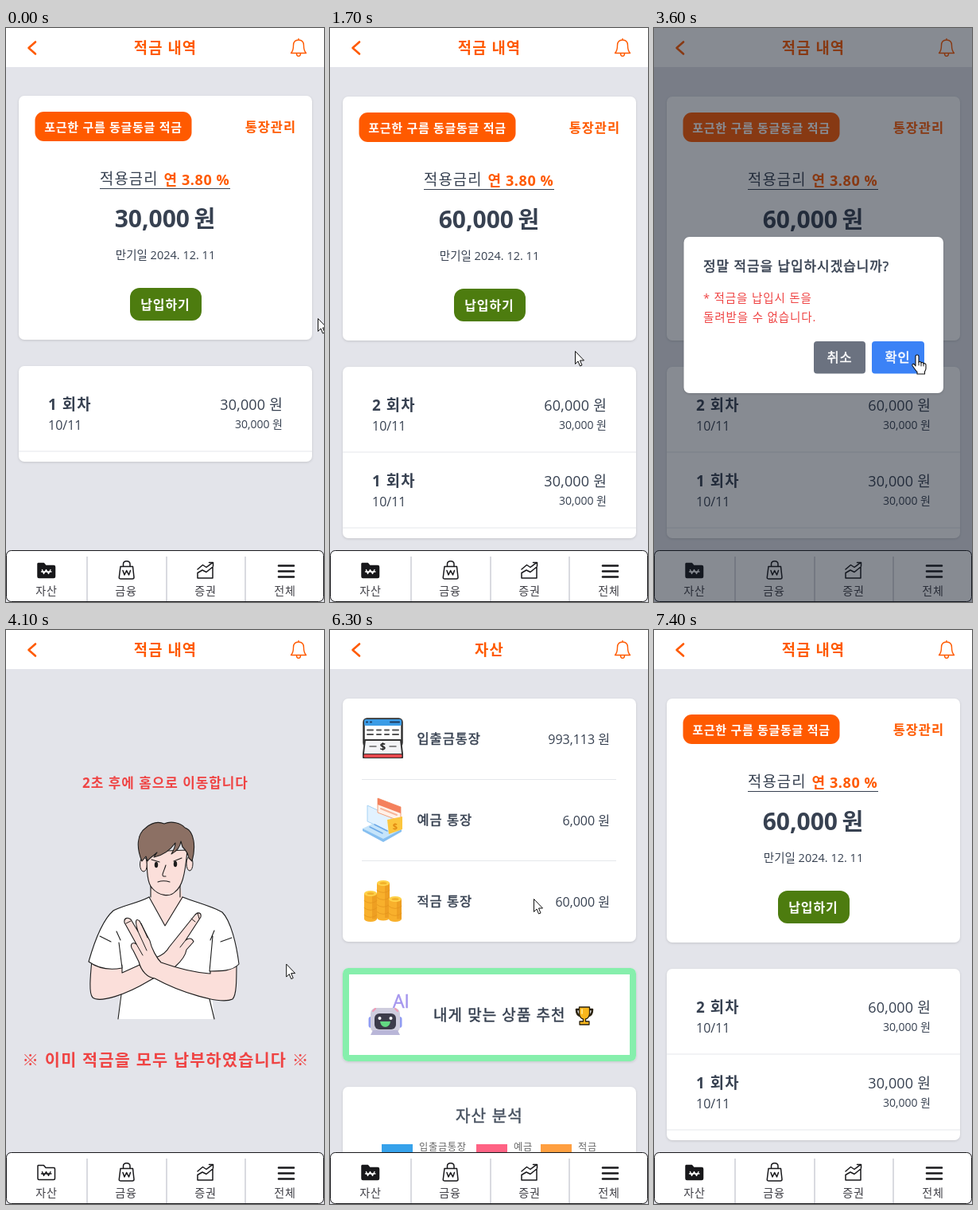
These frames come from a looping animation (400x720 px, 7.5 s). An HTML page:

```html
<!DOCTYPE html>
<html lang="ko">
<meta charset="utf-8">
<style>
html, body { margin: 0; height: 100%; overflow: hidden; background: #e3e4ea }
svg { display: block; width: 400px; height: 720px }
text { font-family: "Open Sans", "Noto Sans CJK KR", "Noto Sans CJK", sans-serif; white-space: pre }
.card { fill: #fff; filter: drop-shadow(0 1px 1.5px #0002) }
.line { fill: none; stroke-linecap: round; stroke-linejoin: round }
</style>
<body>
<script>
const ORANGE = '#ff5a00', INK = '#374151', RED = '#ef4444', RULE = '#e5e7eb';

// Drawing helpers: each returns SVG markup
function text(x, y, s, size, { w = 400, c = INK, a = 'start', ls = 0 } = {}) {
  // Hangul is set a little smaller and wider apart; weight 600 is regular with a thin outline
  if (/[가-힣]/.test(s) && !/\d{2}/.test(s)) {
    ls += size * .055;
    size *= .94;
  }
  const semi = w === 600 ? `stroke="${c}" stroke-width=".5"` : '';
  return `<text x="${x}" y="${y}" font-size="${size}" font-weight="${semi ? 400 : w}" fill="${c}" text-anchor="${a}" letter-spacing="${ls}" ${semi}>${s}</text>`;
}
const rect = (x, y, w, h, c, r = 0, extra = '') =>
  `<rect x="${x}" y="${y}" width="${w}" height="${h}" rx="${r}" fill="${c}" ${extra}/>`;
const card = (y, h) => rect(16, y, 369, h, '#fff', 7, 'class="card"');
const path = (d, fill, stroke = 'none', w = 1) =>
  `<path d="${d}" fill="${fill}" stroke="${stroke}" stroke-width="${w}" stroke-linejoin="round"/>`;
const line = (d, c, w = 1) => `<path class="line" d="${d}" stroke="${c}" stroke-width="${w}"/>`;
const oval = (x, y, rx, ry, fill, extra = '') =>
  `<ellipse cx="${x}" cy="${y}" rx="${rx}" ry="${ry}" fill="${fill}" ${extra}/>`;
const group = (id, s) => `<g id="${id}">${s}</g>`;

const header = title => rect(0, 0, 400, 49, '#fff') +
  line('M37 17.5L28.5 25L37 32.5', ORANGE, 2.6) +
  text(200.5, 31.5, title, 20, { w: 700, c: ORANGE, a: 'middle' }) +
  line('M358.5 31.5C361 29 361.5 27 361.5 22C361.5 17.5 364 15 368 15S374.5 17.5 374.5 22C374.5 27 375 29 377.5 31.5ZM365.5 32C365.5 36.5 370.5 36.5 370.5 32M368 15V13.5', ORANGE, 1.4);

function nav(active) {
  const mark = active ? '#fff' : '#18181b';
  const icons =
    path('M40.5 671.5H47.5L50 674.5H60Q61.5 674.5 61.5 676V688Q61.5 689.5 60 689.5H41.5Q40 689.5 40 688V672Z', active ? '#18181b' : '#fff', '#18181b', 1.5) +
    line('M45.5 679.5L47.5 684.5L50.5 679.5L53.5 684.5L56 679.5M44.5 682H57', mark, 1.3) +
    line('M144 675.5H159.5L161 689Q161 691 159 691H144.5Q142 691 142.3 689ZM147.5 675V672.5C147.5 667.5 156 667.5 156 672.5V675M147 680.5L149 686L151.7 680.5L154.5 686L156.5 680.5', '#18181b', 1.5) +
    line('M241 690V683.5L247 680L252 682.5L260 676V690ZM241 679L247.5 673.5L252 676.5L260 670.5M255.5 670.5H260.5V675', '#18181b', 1.5) +
    line('M343 674.5H362M343 681.5H362M343 688.5H362', '#18181b', 2.6);
  return rect(.5, 655.5, 399, 64, '#fff', 6, 'stroke="#18181b"') + icons +
    [102, 202, 301].map(x => rect(x - 1, 663, 2, 56, '#d9dae0')).join('') +
    ['자산', '금융', '증권', '전체'].map((s, i) =>
      text(51 + i * 100, 711, s, 15, { c: '#3f3f46', a: 'middle' })).join('');
}

function savings(rounds) {
  let rows = '';
  for (let n = rounds, y = 0; n > 0; n--, y += 95) rows +=
    text(53, 479 + y, n + ' 회차', 20, { w: 700 }) +
    text(53, 504 + y, '10/11', 16) +
    text(348, 479 + y, n * 30 + ',000 원', 18, { a: 'end', ls: .2 }) +
    text(348, 502 + y, '30,000 원', 14, { a: 'end' }) +
    rect(16, 530.5 + y, 369, 1, RULE);
  const body = card(85, 306) +
    rect(36.5, 105, 197, 37, ORANGE, 11) +
    text(135, 129.5, '포근한 구름 동글동글 적금', 16, { w: 700, c: '#fff', a: 'middle', ls: -.2 }) +
    text(365, 129.5, '통장관리', 17.5, { w: 700, c: ORANGE, a: 'end' }) +
    text(118, 196, '적용금리', 20) +
    text(198.5, 196.5, '연 3.80 %', 18, { w: 700, c: ORANGE, ls: .6 }) +
    rect(118, 201, 164, 1, INK) +
    text(231, 250, rounds * 30 + ',000', 30, { w: 700, a: 'end' }) +
    text(236.5, 250, '원', 31, { w: 700 }) +
    text(200.5, 290, '만기일 2024. 12. 11', 14.5, { a: 'middle' }) +
    rect(156, 326, 90, 41, '#4d7c0f', 12) +
    text(200.5, 353, '납입하기', 17, { w: 700, c: '#fff', a: 'middle' }) +
    card(424, 25 + rounds * 95) + rows;
  return `<g transform="translate(0 ${rounds - 1})">${body}</g>` + header('적금 내역') + nav(true);
}

function man() {
  const skin = '#fbdfda', ink = '#1c1c1c';
  const shape = (d, fill) => path(d, fill, ink, 1.1);
  return path('M180 336C165 343 145 346 135 352L146 424L141 488H262L256 428L272 354C258 346 240 342 222 336Z', '#fff') +
    path('M182 318V338L200 371L222 337L219 318Z', skin) +
    line('M182 318V335M219 320V335M180 335L200 371L222 335', ink, 1.1) +
    shape('M108 414C106 435 104 456 109 461C118 468 150 458 180 440L213 422C222 414 226 408 227 401L236 391C234 386 230 386 226 389L245 360C246 355 242 353 238 357L205 398C200 408 190 410 186 412L146 430V420Z', skin) +
    line('M241 355L243 362M233 362L238 366M226 389L219 398', ink) +
    shape('M290 416C290 440 290 458 285 463C270 470 220 455 187 437C178 436 170 428 167 416L160 402C155 396 158 390 164 394L149 367C148 361 153 360 157 363L166 378C162 365 163 361 168 365L181 390C183 400 190 412 195 417C215 424 240 430 257 431V424Z', skin) +
    line('M151 368L157 365M166 378L177 402M164 394L172 408M170 368L178 386', ink) +
    path('M135 352C120 365 110 395 104 416C115 424 130 427 146 424L151 375ZM272 354C283 365 290 395 293 419C285 428 270 428 256 428L251 377Z', '#fff') +
    line('M180 335C165 343 145 346 135 352C120 365 110 395 104 416C115 424 130 427 146 424L142 392M222 335C240 342 258 346 272 354C283 365 290 395 293 419C285 428 270 428 256 428L260 384M145 457L141 488M256 463L262 488M257 389L262 377M144 389L139 378M118 384L132 391M270 391L284 386', ink, 1.1) +
    oval(173, 294, 4.5, 9, skin, `stroke="${ink}"`) + oval(231, 293, 4, 9, skin, `stroke="${ink}"`) +
    shape('M177 278C177 305 178 318 184 324C192 333 206 336 213 328C221 322 225 310 228 276Z', skin) +
    shape('M171 290C164 274 164 256 176 248C184 241 192 240 199 243C208 239 220 242 225 248C237 252 239 272 234 290L230 286C229 280 226 276 222 272L220 265C219 272 214 278 208 281C211 276 213 272 213 267C206 277 196 283 186 285L190 279C185 284 180 286 178 290L176 284Z', '#8c7064') +
    line('M183 288L193 291M221 286L211 290', ink, 1.2) +
    oval(189, 294.5, 2.2, 3.8, ink) + oval(213, 293.5, 2.2, 3.8, ink) +
    line('M201 295C199 302 195 308 198 309H201M191 316Q198 313.5 206 316', ink, 1.1);
}

const failed = () => text(200.5, 198, '2초 후에 홈으로 이동합니다', 18, { w: 700, c: RED, a: 'middle' }) +
  man() +
  text(201, 547, '※ 이미 적금을 모두 납부하였습니다 ※', 22.1, { w: 700, c: RED, a: 'middle' }) +
  header('적금 내역') + nav(false);

const bankbook = () =>
  rect(42.5, 111.5, 48, 34, '#fff', 4, 'stroke="#333" stroke-width="2.5"') +
  rect(43, 112, 47, 8, '#3b9ce6', 2) +
  line('M46 115.5H47M51 115.5H52M76 115.5H87', '#1e3a5f', 2) +
  line('M47 125.5H54M59 125.5H64M69 125.5H74M79 125.5H86M47 131H54M59 131H64M69 131H74M79 131H86', '#555', 2) +
  path('M44 138H89L91 155V160H42V155Z', '#f3f4f6', '#333', 2) +
  rect(42, 155.5, 49, 5, '#e5484d', 2, 'stroke="#333"') +
  text(66.5, 150.5, '$', 13, { w: 700, c: '#222', a: 'middle' }) +
  line('M50 146H58M75 146H83', '#666', 1.5);

const laptop = () =>
  path('M41 249L64 238L90 252L67 265Z', '#c5e4fa') +
  path('M41 249L67 262V266L41 252ZM67 262L90 250V253L67 266Z', '#86bff0') +
  path('M47 220L77 234V254L47 240Z', '#e2f2ff', '#a5d2f5') +
  path('M60 211L89 222V240L60 229Z', '#fff1e8', '#f2a07b') +
  path('M60 211L89 222V230L60 219Z', '#f4805c') +
  line('M64 224L84 232', '#f7b59a', 2) +
  line('M50 247L66 255M56 244L72 252', '#6ca9e8', 1.5) +
  path('M72 238L91 234V250L74 256Z', '#fcc63d') +
  text(82, 250, '$', 11, { w: 700, c: '#e28a12', a: 'middle' });

function coins() {
  const stack = (x, top, bottom) => {
    let s = rect(x - 8, top, 16, bottom - top, '#f8b02c') + oval(x, bottom, 8, 3.5, '#f8b02c') +
      rect(x + 2, top, 6, bottom - top, '#ee9f22');
    for (let y = top + 9; y < bottom; y += 9) s += line(`M${x - 8} ${y}Q${x} ${y + 6} ${x + 8} ${y}`, '#e3921c', .7);
    return s + oval(x, top, 8, 3.5, '#ffd24a') + oval(x, top, 4.5, 1.6, '#f2b12b');
  };
  return stack(67, 317.5, 361) + stack(51, 330.5, 362.5) + stack(82, 337.5, 362.5);
}

const robot = () =>
  text(79, 474, 'AI', 23, { w: 600, c: '#a596ee' }) +
  rect(48.5, 485, 6, 14, '#8f9bf2', 3) + rect(84.5, 485, 6, 14, '#8f9bf2', 3) +
  rect(51, 474, 37, 31, '#cfcddd', 7) + path('M54 502H85L88 508H51Z', '#b9b6d8') +
  rect(56, 481, 27, 20, '#3d3c4a', 6) +
  oval(62.5, 487, 2, 2, '#fff') + oval(76.5, 487, 2, 2, '#fff') +
  path('M63 491H76Q75 498 69.5 498T63 491Z', '#63d982') + line('M57 475L54 478M82 475L85 478', '#f39ab4', 2);

const trophy = () =>
  line('M314 476H310Q310 484 316 484M326 476H330Q330 484 324 484', '#2b2310', 2.6) +
  path('M313.5 473H326.5V481Q326 487 321.5 488V491H326V495H314V491H318.5V488Q314 487 313.5 481Z', '#f8b71d', '#2b2310', 1.3) +
  rect(316, 475, 2, 7, '#ffe27a', 1);

function home() {
  const rows = [['입출금통장', '993,113'], ['예금 통장', '6,000'], ['적금 통장', '60,000']].map(([name, sum], i) =>
    text(109.5, 142 + i * 102, name, 17.5, { w: 600 }) +
    text(352, 142.5 + i * 102, sum + ' 원', 16, { a: 'end' }) +
    (i < 2 ? rect(40, 187 + i * 102, 320, 1, RULE) : '')).join('');
  const legend = [[65, '#36a2eb', '입출금통장'], [184, '#ff6384', '예금'], [265, '#ff9f40', '적금']].map(([x, c, s]) =>
    rect(x, 645, 39, 12, c) + text(x + 47, 653, s, 13, { c: '#666' })).join('');
  return card(86, 305) + rows + bankbook() + laptop() + coins() +
    card(424, 117) + rect(20, 428, 361, 109, '#fff', 3, 'stroke="#86efac" stroke-width="8"') +
    robot() + text(130, 489.5, '내게 맞는 상품 추천', 20.2, { w: 600 }) + trophy() +
    card(573, 200) + text(200.5, 616.5, '자산 분석', 21.4, { w: 600, c: '#4b5563', a: 'middle' }) +
    legend + header('자산') + nav(true);
}

const modal = () => rect(0, 0, 400, 720, '#111827', 0, 'opacity=".5"') +
  rect(37.5, 262, 326.5, 196, '#fff', 7, 'class="card"') +
  text(62, 305, '정말 적금을 납입하시겠습니까?', 18, { w: 600 }) +
  text(62, 343.5, '* 적금을 납입시 돈을', 15.5, { c: RED }) +
  text(62, 367.5, '돌려받을 수 없습니다.', 15.5, { c: RED }) +
  rect(201, 393, 65, 40.5, '#6b7280', 4) + rect(274, 393, 66, 40.5, '#3b82f6', 4) +
  text(233.5, 419, '취소', 17.5, { w: 600, c: '#fff', a: 'middle' }) +
  text(306.5, 419, '확인', 17.5, { w: 600, c: '#fff', a: 'middle' });

const cursors =
  group('arrow', path('M.5 .5V16.5L4 13L6.5 19L9 18L6.5 12H11.5Z', '#fff', '#111')) +
  group('hand', path('M-2 1A2 2 0 0 1 2 1V8C3 7 5 7.5 5 9C6 8 8 8.5 8 10C9.5 9.2 11 10 11 11.5V16C11 18 10 19 9.5 20V23H0V20.5C-2 18.5 -4 15.5 -6 12.5C-6.8 11 -5 9.5 -3.5 11L-2 13Z', '#fff', '#111', 1.1) +
    line('M2 8V12M5 9V13M8 10V13', '#111'));

document.body.innerHTML = '<svg viewBox="0 0 400 720">' +
  group('first', savings(1)) + group('second', savings(2)) + group('failed', failed()) +
  group('home', home()) + group('modal', modal()) + group('cursor', cursors) + '</svg>';

const LOOP = 7500;
// Start time, page, whether the dialog is open
const scenes = [[0, 'first'], [500, 'first', true], [1500, 'second'], [2800, 'second', true],
  [3900, 'failed'], [6000, 'home'], [6600, 'second']];
// Cursor stops: time, x, y of the hotspot
const stops = [[0, 392, 364], [100, 392, 364], [450, 209, 352], [650, 209, 352], [900, 254, 380],
  [1300, 308, 405], [1900, 308, 405], [2500, 209, 353], [3000, 209, 353], [3600, 331, 411],
  [3900, 331, 411], [4500, 412, 440], [5800, 412, 300], [6250, 256, 337], [6600, 256, 337],
  [7000, 412, 380], [LOOP, 412, 364]];

const el = id => document.getElementById(id);
const show = (id, on) => el(id).style.display = on ? '' : 'none';
const inside = (x, y, l, t, r, b) => x >= l && x <= r && y >= t && y <= b;

function draw(now) {
  const time = now % LOOP;
  const [, page, asking = false] = scenes.findLast(s => s[0] <= time);
  for (const id of ['first', 'second', 'failed', 'home']) show(id, id === page);
  show('modal', asking);

  const i = stops.findLastIndex(s => s[0] <= time);
  const [t0, x0, y0] = stops[i], [t1, x1, y1] = stops[i + 1];
  const p = (time - t0) / (t1 - t0), e = p * p * (3 - 2 * p);
  const x = x0 + (x1 - x0) * e, y = y0 + (y1 - y0) * e;
  const hand = asking
    ? inside(x, y, 201, 393, 266, 433) || inside(x, y, 274, 393, 340, 433)
    : (page === 'first' || page === 'second') && inside(x, y, 156, 327, 246, 368);
  show('hand', hand);
  show('arrow', !hand);
  el('cursor').setAttribute('transform', `translate(${x.toFixed(1)} ${y.toFixed(1)})`);
  requestAnimationFrame(draw);
}
requestAnimationFrame(draw);
</script>
</body>
</html>
```
